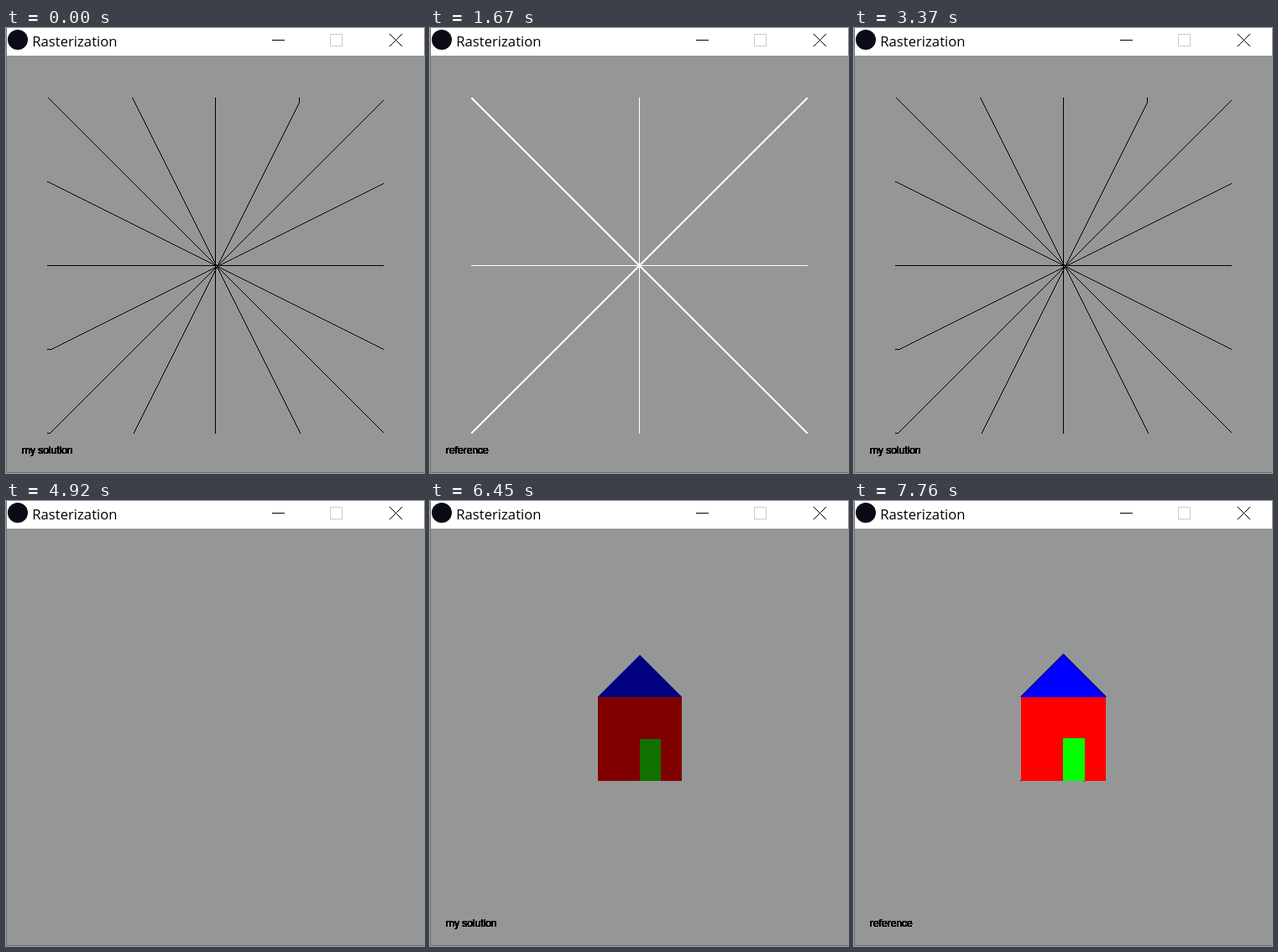
These frames come from a looping animation (498x531 px, 8 s). An HTML page with a canvas:

```html
<!DOCTYPE html>
<html>
<head>
<meta charset="utf-8">
<title>Rasterization</title>
<style>
  html, body { margin: 0; width: 100%; height: 100%; overflow: hidden; }
  canvas { display: block; }
</style>
</head>
<body>
<canvas id="stage" width="498" height="531"></canvas>
<script>
const ctx = document.getElementById('stage').getContext('2d');
const LOOP = 8000;
const LEFT = 49, TOP = 83, SIZE = 400;

// The view is cleared at `start` and stays empty for `blank` ms.
const scenes = [
  { start: -1500, blank: 0, label: 'my solution', draw: pixelLines },
  { start: 500, blank: 80, label: 'reference', draw: smoothLines },
  { start: 2600, blank: 80, label: 'my solution', draw: pixelLines },
  { start: 4920, blank: 240, label: 'my solution', draw: pixelHouse },
  { start: 6760, blank: 80, label: 'reference', draw: smoothHouse },
];

function rect(color, x, y, w, h) {
  ctx.fillStyle = color;
  ctx.fillRect(x, y, w, h);
}

function stroke(color, width, ...points) {
  ctx.strokeStyle = color;
  ctx.lineWidth = width;
  ctx.beginPath();
  points.forEach(([x, y]) => ctx.lineTo(x, y));
  ctx.stroke();
}

function text(string, x, y, font) {
  ctx.font = font;
  ctx.fillStyle = '#000';
  ctx.fillText(string, x, y);
}

// Rows that widen by one pixel on each side.
function gable(color, x, y, width, height) {
  for (let i = 0; i < height; i++) rect(color, x - i, y + i, width + 2 * i, 1);
}

function cross(color) {
  rect(color, LEFT, TOP + SIZE / 2, SIZE + 1, 1);
  rect(color, LEFT + SIZE / 2, TOP, 1, SIZE + 1);
}

// Hard pixels; the rising lines flatten where they hit their end coordinate.
function pixelLines() {
  const cx = 251, cy = 284, right = LEFT + SIZE, bottom = TOP + SIZE;
  const dot = (x, y) => {
    if (x >= LEFT && x <= right && y >= TOP && y <= bottom) rect('#000', x, y, 1, 1);
  };
  cross('#000');
  for (let d = LEFT - cx; d <= bottom - cy; d++) {
    const half = Math.floor(d / 2);
    dot(cx + d, cy + d);
    dot(cx + d, Math.min(cy - d, bottom));
    dot(cx + d, cy + half);
    dot(cx + d, Math.min(cy - half, bottom - SIZE / 4));
    dot(cx + half, cy + d);
    dot(Math.min(cx - half, right - SIZE / 4), cy + d);
  }
}

function smoothLines(passes) {
  const x0 = LEFT + 0.5, y0 = TOP + 0.5;
  cross('#fff');
  for (let i = 0; i < Math.min(passes, 12); i++) {
    stroke('#fff', 1.4, [x0, y0], [x0 + SIZE, y0 + SIZE]);
    stroke('#fff', 1.4, [x0 + SIZE, y0], [x0, y0 + SIZE]);
  }
}

function pixelHouse() {
  gable('#000080', 249, 184, 2, 50);
  rect('#800000', 200, 234, 100, 100);
  rect('#107000', 250, 284, 25, 50);
}

function smoothHouse() {
  gable('#00f', 249, 183, 1, 51);
  stroke('#000040', 1, [198.5, 233.5], [249.5, 182.5], [300.5, 233.5]);
  rect('#f00', 199, 234, 101, 100);
  rect('#0f0', 249, 283, 26, 51);
  rect('#000', 198, 333, 1, 1);
  rect('#000', 274, 334, 1, 1);
}

function windowFrame() {
  rect('#fff', 0, 0, 498, 33);
  rect('#959796', 0, 33, 498, 498);
  rect('#707270', 0, 0, 1, 531);
  rect('#707270', 0, 530, 498, 1);
  ctx.fillStyle = '#0a0b16';
  ctx.beginPath();
  ctx.arc(14, 14, 12, 0, 2 * Math.PI);
  ctx.fill();
  text('Rasterization', 31.2, 22, '16.7px "Open Sans", sans-serif');
  rect('#000', 317, 14, 15, 1);
  ctx.strokeStyle = '#ccc';
  ctx.lineWidth = 1;
  ctx.strokeRect(386.5, 7.5, 14, 14);
  stroke('#000', 1, [457, 7], [472, 22]);
  stroke('#000', 1, [472, 7], [457, 22]);
}

function render(time) {
  const scene = scenes.findLast(s => s.start <= time);
  const age = time - scene.start - scene.blank;
  windowFrame();
  if (age < 0) return;
  // Everything is painted over itself, so soft edges harden with time.
  const passes = Math.min(40, 1 + Math.floor(age * 0.03));
  scene.draw(passes);
  for (let i = 0; i < passes; i++) {
    text(scene.label, 19, 508, '12px "Liberation Sans", Arial, sans-serif');
  }
}

const begin = performance.now();
function tick() {
  render((performance.now() - begin) % LOOP);
  requestAnimationFrame(tick);
}
tick();
</script>
</body>
</html>
```
